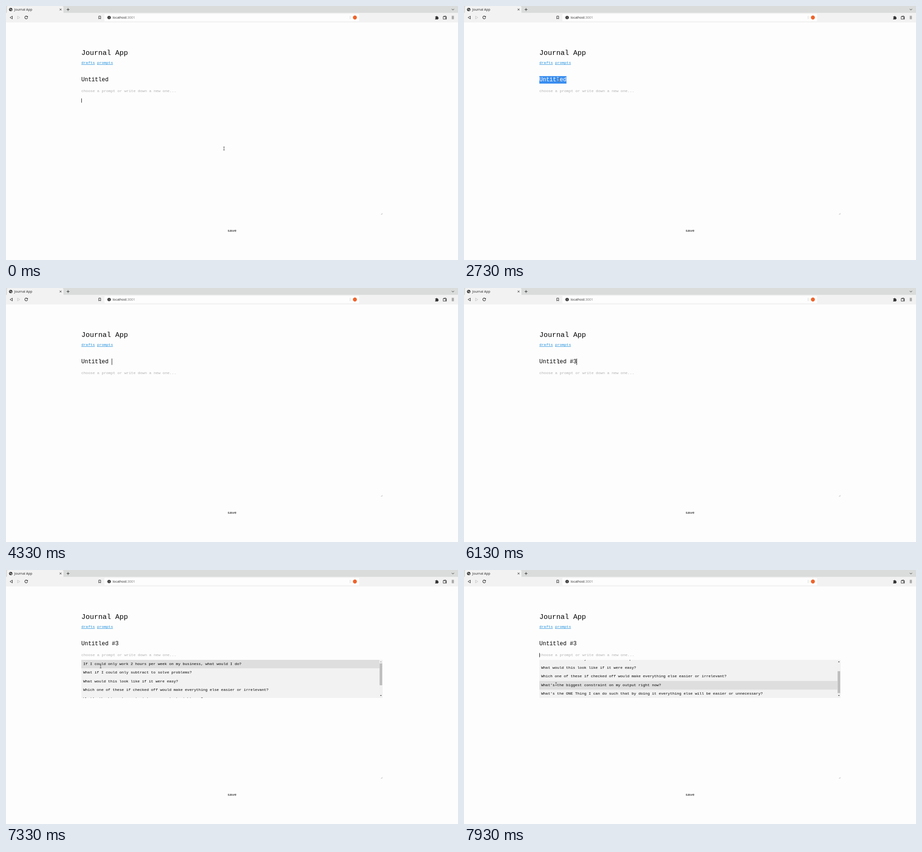
An HTML page with a canvas for the animation above (8 s loop, 960 px wide and 540 px high).

```html
<!DOCTYPE html>
<html lang="en">
<head>
<meta charset="utf-8">
<title>Journal App</title>
<style>
  html, body { margin: 0; width: 100%; height: 100%; overflow: hidden; background: #fdfdfd; }
  canvas { display: block; }
</style>
</head>
<body>
<canvas id="stage" width="960" height="540"></canvas>
<script>
const ctx = document.getElementById('stage').getContext('2d');
const LOOP = 8000, BLINK = 600;
const MONO = '"Liberation Mono", monospace', SANS = '"Noto Sans", sans-serif';
const PAGE = '#fdfdfd', PANEL = '#f2f2f2', STRIP = '#d9dcdb', HOVER = '#dedede', INK = '#303030';
const LINK = '#1f8fdc';

const TITLE = 'Untitled #3';
const KEY_TIMES = [2870, 3130, 3330, 3470, 3670, 3870, 4000, 4130, 4330, 4670, 4930];
const SELECT_AT = 2070, PROMPT_AT = 6730, SCROLL_AT = 7740;
const ROW = 18.5, LIST_TOP = 191, LIST_HEIGHT = 81, MAX_SCROLL = 31;
const PROMPTS = [
  'If I could only work 2 hours per week on my business, what would I do?',
  'What if I could only subtract to solve problems?',
  'What would this look like if it were easy?',
  'Which one of these if checked off would make everything else easier or irrelevant?',
  'What\u2019s the biggest constraint on my output right now?',
  'What\u2019s the ONE Thing I can do such that by doing it everything else will be easier or unnecessary?'
];
// time, x, y
const MOUSE = [
  [0, 463, 303], [670, 463, 303], [1470, 240, 203], [1990, 201, 157], [6270, 201, 157],
  [6670, 201, 181], [7130, 201, 181], [7330, 201, 205], [7730, 196, 240], [7930, 195.5, 242.5], [LOOP, 195.5, 242.5]
];

function rect(x, y, w, h, color) {
  ctx.fillStyle = color;
  ctx.fillRect(x, y, w, h);
}
function text(str, x, y, size, color = '#000', family = MONO) {
  ctx.font = `${size}px ${family}`;
  ctx.fillStyle = color;
  ctx.fillText(str, x, y);
}
function shape(d, color, width = 0) {
  const path = new Path2D(d);
  if (width) {
    ctx.strokeStyle = color;
    ctx.lineWidth = width;
    ctx.stroke(path);
  } else {
    ctx.fillStyle = color;
    ctx.fill(path);
  }
}
function disc(x, y, r, color) {
  ctx.fillStyle = color;
  ctx.beginPath();
  ctx.arc(x, y, r, 0, 7);
  ctx.fill();
}
function link(str, x) {
  text(str, x, 123, 8, LINK);
  rect(x, 124, str.length * 4.8, 0.8, LINK);
}
const caretOn = (t, since) => Math.floor(Math.max(0, t - since) / BLINK) % 2 === 0;

function mouseAt(t) {
  const i = MOUSE.findIndex(point => point[0] > t);
  const [t0, x0, y0] = MOUSE[i - 1], [t1, x1, y1] = MOUSE[i];
  const k = (t - t0) / (t1 - t0);
  return [x0 + (x1 - x0) * k, y0 + (y1 - y0) * k];
}

function drawBrowser() {
  rect(0, 0, 960, 35, PANEL);
  rect(0, 0, 960, 14.5, STRIP);
  ctx.fillStyle = PANEL;
  ctx.beginPath();
  ctx.roundRect(2, 0, 120, 16, [3, 3, 0, 0]);
  ctx.fill();
  disc(10, 7.5, 3.6, INK);
  shape('M8 6.2L10 5.6 9.4 7.4 8 7.6ZM10.4 7.6L12.4 7 11.6 9.4 10.2 9.8Z', PANEL);
  text('Journal App', 17.5, 10, 7, INK, SANS);
  shape('M114 5.6l3.8 3.8m0-3.8l-3.8 3.8M128.8 7.5h6m-3-3v6M946.8 6.2l2.4 2.4 2.4-2.4', INK, 1);

  shape('M13.5 21.5v6l-5-3z', INK, 1);
  shape('M24.5 21.5v6l5-3z', '#c8c8c8', 1);
  shape('M45.4 22.6a3 3 0 1 0 .5 2.4', INK, 1.1);
  shape('M46.4 21v3h-3z', INK);
  shape('M197 21.5h4v6l-2-1.7-2 1.7z', INK, 1);
  ctx.fillStyle = PAGE;
  ctx.beginPath();
  ctx.roundRect(209, 16.5, 541, 16, 2);
  ctx.fill();
  disc(219, 24.5, 3.6, INK);
  rect(218.6, 22.3, 0.9, 0.9, PAGE);
  rect(218.6, 23.9, 0.9, 2.6, PAGE);
  text('localhost', 226.5, 27, 7, INK, SANS);
  text(':3001', 226.5 + ctx.measureText('localhost').width, 27, 7, '#777', SANS);
  rect(730.5, 21, 0.8, 7, '#d0d0d0');
  disc(741, 24.5, 4.2, '#f0642c');
  shape('M911.5 22.5h2a1.2 1.2 0 1 1 2.4 0h1.8v2a1.2 1.2 0 1 1 0 2.4v1.6h-6.2v-2a1.2 1.2 0 0 0 0-2.4z', INK);
  shape('M928.5 22.5h7v5.5h-7zM929 22l5-.8v1.2M933 24.5h2.5v1.8h-2.5z', INK, 0.9);
  shape('M946.7 22h4.6m-4.6 2.5h4.6m-4.6 2.5h4.6', INK, 0.9);
}

function drawTitle(t) {
  const typed = KEY_TIMES.filter(time => time <= t).length;
  if (!typed) {
    const selected = t >= SELECT_AT;
    if (selected) rect(160, 149, 57.6, 16, '#3a8ef0');
    text('Untitled', 160, 160, 12, selected ? '#fff' : '#000');
    return;
  }
  text(TITLE.slice(0, typed), 160, 160, 12);
  if (t < PROMPT_AT && caretOn(t, KEY_TIMES[typed - 1])) rect(160 + typed * 7.2 - 0.3, 150, 0.9, 13.5, '#000');
}

function arrow(y, dir, color) {
  shape(`M794.5 ${y}h3.4l-1.7 ${2 * dir}z`, color);
}

function drawList(t, mouseY) {
  const k = Math.min(1, Math.max(0, (t - SCROLL_AT) / 330));
  const scroll = MAX_SCROLL * (1 - (1 - k) ** 3);
  const top = LIST_TOP - 0.5 - scroll;
  const hovered = mouseY > LIST_TOP ? Math.floor((mouseY - top) / ROW) : -1;
  ctx.save();
  ctx.beginPath();
  ctx.rect(160, LIST_TOP, 640, LIST_HEIGHT);
  ctx.clip();
  rect(160, LIST_TOP, 640, LIST_HEIGHT, PANEL);
  PROMPTS.forEach((prompt, i) => {
    const y = top + i * ROW;
    if (i === hovered) rect(160, y, 633, ROW, HOVER);
    text(prompt, 164, Math.floor(y + 11.5), 8);
  });
  rect(793, LIST_TOP, 7, LIST_HEIGHT, '#f1f1f1');
  rect(793.5, 198.5 + scroll / MAX_SCROLL * 18, 5.5, 46.5, '#bebebe');
  arrow(196, -1, scroll ? INK : '#a0a0a0');
  arrow(266, 1, INK);
  ctx.restore();
}

function drawMouse(x, y) {
  shape(`M${x - 1.8} ${y - 3.2}h3.6M${x} ${y - 3.2}v6.4M${x - 1.8} ${y + 3.2}h3.6`, '#555', 0.9);
}

function draw(t) {
  rect(0, 0, 960, 540, PAGE);
  drawBrowser();
  text('Journal App', 160, 104, 15);
  link('drafts', 160);
  link('prompts', 193.6);
  drawTitle(t);
  text('choose a prompt or write down a new one...', 160, 183, 8, '#b0b0b0');
  shape('M796.5 443.5l3-3m-1 3l1-1', '#909090', 0.7);
  text('save', 470.4, 480, 8);
  if (t < SELECT_AT && caretOn(t, 70)) rect(160, 196.5, 0.9, 9, '#000');

  const [x, y] = mouseAt(t);
  if (t >= PROMPT_AT) {
    if (caretOn(t, PROMPT_AT)) rect(160, 176.5, 0.9, 9, '#000');
    drawList(t, y);
  }
  drawMouse(x, y);
}

function tick() {
  draw(performance.now() % LOOP);
  requestAnimationFrame(tick);
}
tick();
</script>
</body>
</html>
```
